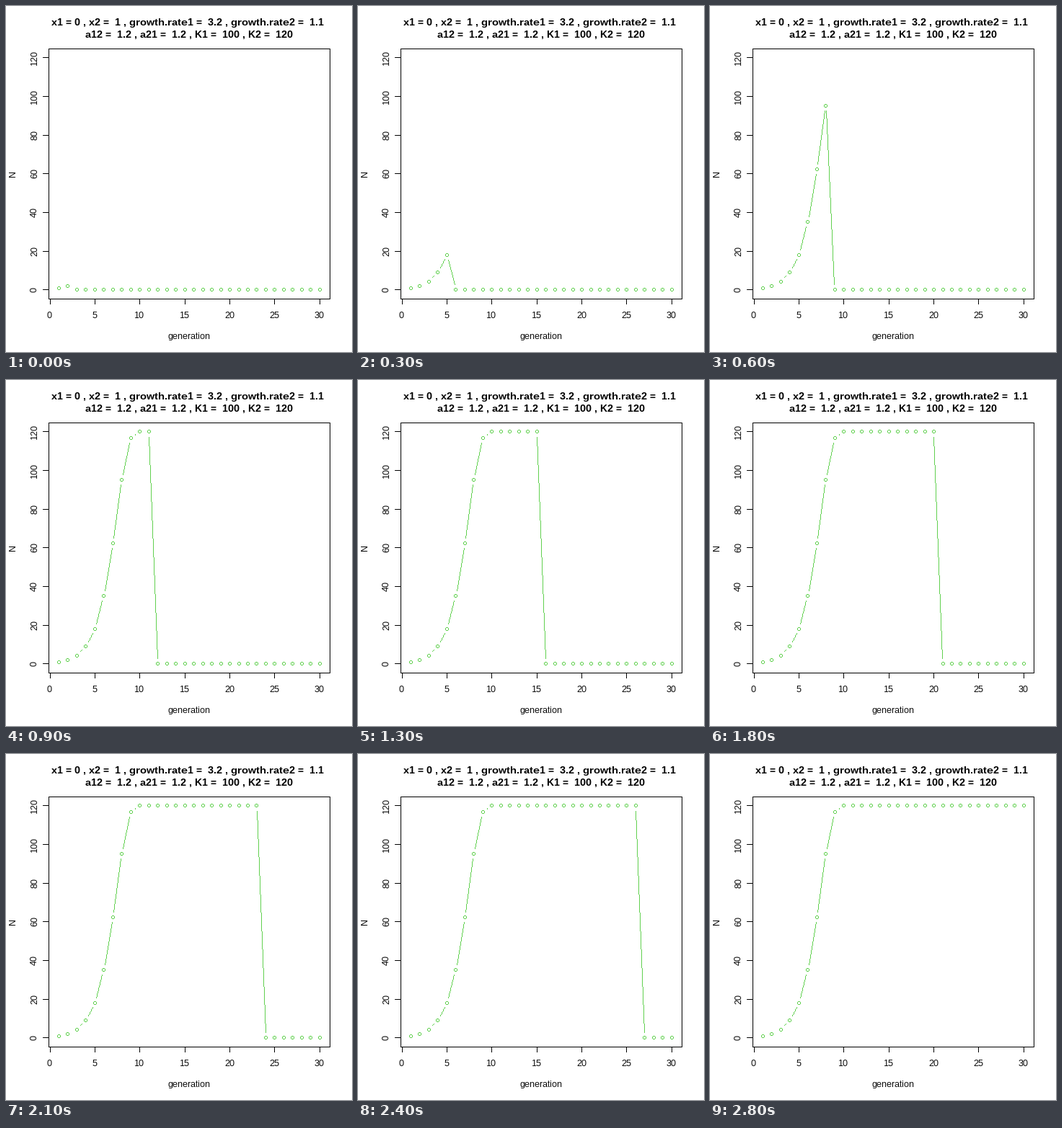
Animation, 480 px wide and 480 px high, one loop 2.9 s. Source, as a matplotlib script:

```python
import numpy as np
import matplotlib.pyplot as plt
from matplotlib.animation import FuncAnimation

plt.rcParams.update({"font.family": "Liberation Sans", "text.hinting": "native",
                     "text.hinting_factor": 1})

SIZE, DPI = 480, 96
PT = 72 / DPI                       # points per pixel
GREEN, BLACK = (0x61, 0xD0, 0x4F), (0, 0, 0)
LINE = 14.4                         # height of one margin line
LEFT, TOP = 4.1 * LINE, 4.1 * LINE
RIGHT, BOTTOM = SIZE - 2.1 * LINE, SIZE - 5.1 * LINE
STEPS, RATE, CAPACITY = 30, 1.1, 120
GAP = LINE / 2                      # space between a point and its line
DIGIT = 7                           # advance of one axis digit
RING = [(2, 1), (1, 2), (-1, 2), (-2, 1), (-2, -1), (-1, -2), (1, -2), (2, -1), (2, 1)]

fig = plt.figure(figsize=(SIZE / DPI, SIZE / DPI), dpi=DPI, facecolor="white")
ax = fig.add_axes([0, 0, 1, 1])
ax.axis("off")


def px(gen):
    lo, hi = 1 - 0.04 * (STEPS - 1), STEPS + 0.04 * (STEPS - 1)
    return LEFT + (gen - lo) / (hi - lo) * (RIGHT - LEFT)


def py(n):
    lo, hi = -0.04 * CAPACITY, 1.04 * CAPACITY
    return BOTTOM - (n - lo) / (hi - lo) * (BOTTOM - TOP)


def draw_path(canvas, points, color):
    # hard-edged one-pixel lines, ends included
    pts = np.floor(np.array(points, float)).astype(int)
    for a, b in zip(pts, pts[1:]):
        steps = np.abs(b - a).max()
        t = np.linspace(0, 1, steps + 1)[:, None]
        x, y = np.rint(a + t * (b - a)).astype(int).T
        canvas[y, x] = color


def label(x, y, text, size=12, **kw):
    ax.text(np.floor(x), np.floor(y), text, fontsize=size * PT, ha="left",
            va="baseline", rotation_mode="anchor", color="black", **kw)


def draw_axes(canvas):
    draw_path(canvas, [(LEFT, TOP), (RIGHT, TOP), (RIGHT, BOTTOM),
                       (LEFT, BOTTOM), (LEFT, TOP)], BLACK)
    for gen in range(0, 31, 5):
        x, text = px(gen), str(gen)
        draw_path(canvas, [(x, BOTTOM), (x, BOTTOM + LINE / 2)], BLACK)
        label(x - DIGIT * len(text) / 2, 433, text)
    for n in range(0, 121, 20):
        y, text = py(n), str(n)
        draw_path(canvas, [(LEFT, y), (LEFT - LINE / 2, y)], BLACK)
        label(43, y + DIGIT * len(text) / 2, text, rotation=90)


def draw_titles():
    label(63, 27, "x1 = 0 , x2 =  1 , growth.rate1 =  3.2 , growth.rate2 =  1.1",
          14, weight="bold")
    label(110, 44, "a12 =  1.2 , a21 =  1.2 , K1 =  100 , K2 =  120", 14,
          weight="bold")
    label(224, 462, "generation")
    label(13, 237, "N", rotation=90)


def growth():
    n = [1.0]
    while len(n) < STEPS:
        n.append(n[-1] + RATE * n[-1] * (1 - n[-1] / CAPACITY))
    return np.array(n)


base = np.full((SIZE, SIZE, 3), 255, np.uint8)
draw_axes(base)
draw_titles()
plot = ax.imshow(base, extent=(0, SIZE, SIZE, 0), aspect="auto",
                 interpolation="nearest")
population = growth()
gens = np.arange(1, STEPS + 1)


def update(frame):
    # generations not yet simulated stay at zero
    n = np.where(gens <= frame + 2, population, 0)
    points = np.column_stack([px(gens), py(n)])
    canvas = base.copy()
    for a, b in zip(points, points[1:]):
        f = GAP / np.hypot(*(b - a))
        if f < 0.5:
            draw_path(canvas, [a + f * (b - a), b - f * (b - a)], GREEN)
    for p in points:
        draw_path(canvas, p + np.array(RING), GREEN)
    plot.set_data(canvas)
    return [plot]


anim = FuncAnimation(fig, update, frames=STEPS - 1, interval=100, repeat=True,
                     repeat_delay=0, blit=False)
plt.show()
```
